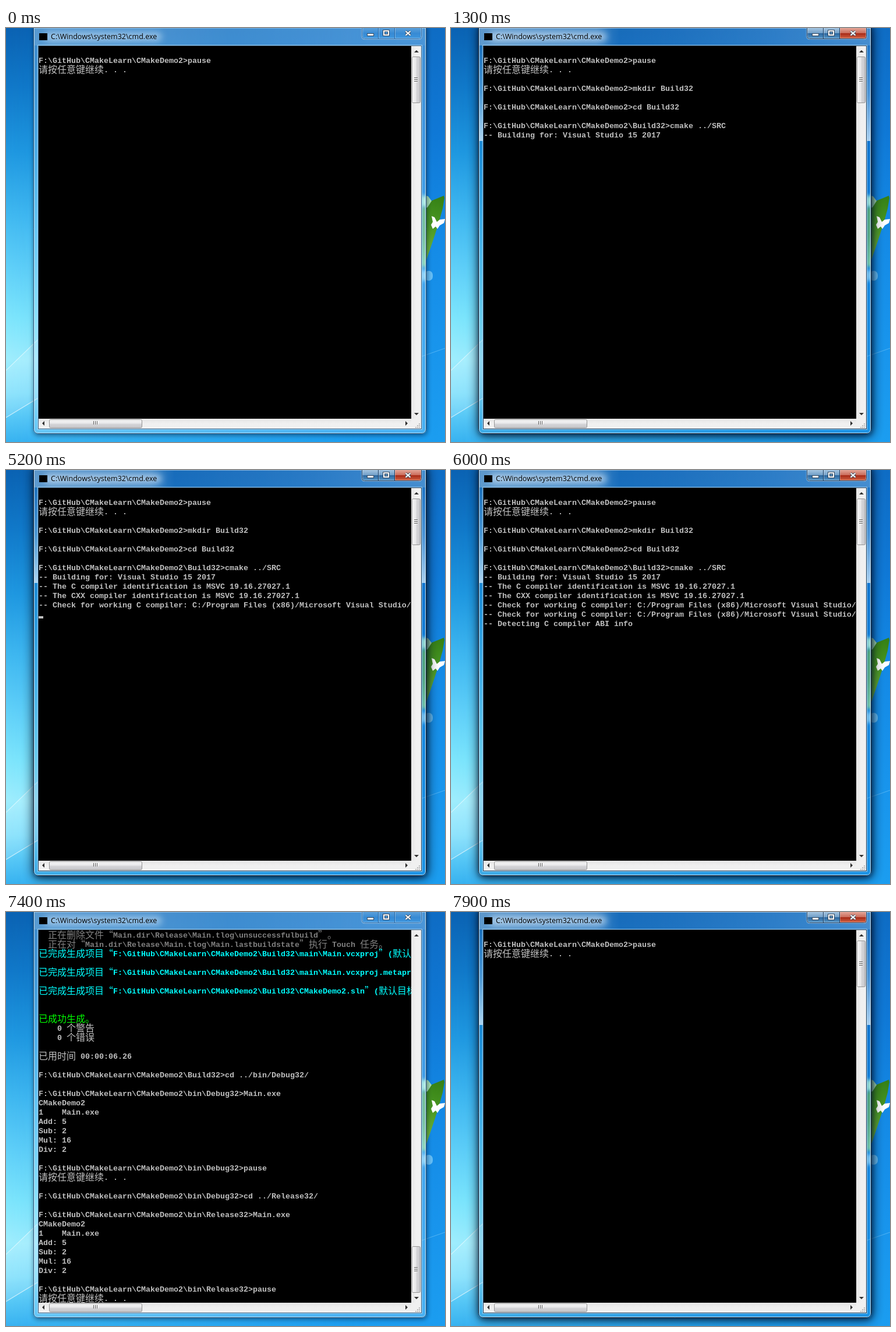
These frames come from a looping animation (754x711 px, 8000 ms). An HTML page with a canvas:

```html
<!DOCTYPE html>
<html lang="zh-CN">
<head>
<meta charset="utf-8">
<title>Console build</title>
<style>
  html, body { margin: 0; width: 100%; height: 100%; overflow: hidden; }
  canvas { display: block; }
</style>
</head>
<body>
<canvas id="stage" width="754" height="711"></canvas>
<script>
const W = 754, H = 711, LOOP = 8000, CELL = 8, ROW = 16;
const ctx = document.getElementById('stage').getContext('2d');

const MONO = 'bold 13.333px "Liberation Mono", monospace';
const CJK = '16px "Noto Sans CJK SC", "Noto Sans CJK", sans-serif';
const SILVER = '#c0c0c0', GRAY = '#808080', CYAN = '#00ffff', GREEN = '#00ff00';

// ---- console contents: a row is a string or [string, colour]
const ROOT = 'F:\\GitHub\\CMakeLearn\\CMakeDemo2';
const PRESS = '请按任意键继续. . . ';
const CHECK = '-- Check for working C compiler: C:/Program Files (x86)/Microsoft Visual Studio/';
const RESULT = ['CMakeDemo2', '1    Main.exe', 'Add: 5', 'Sub: 2', 'Mul: 16', 'Div: 2', ''];
const done = path => [`已完成生成项目“${ROOT}\\Build32\\${path}”(默认目标)的操作。`, CYAN];

const configure = [
  '', ROOT + '>pause', PRESS, '',
  ROOT + '>mkdir Build32', '',
  ROOT + '>cd Build32', '',
  ROOT + '\\Build32>cmake ../SRC',
  '-- Building for: Visual Studio 15 2017',
  '-- The C compiler identification is MSVC 19.16.27027.1',
  '-- The CXX compiler identification is MSVC 19.16.27027.1',
  CHECK, CHECK,
  '-- Detecting C compiler ABI info',
  '-- Detecting C compiler ABI info - done',
  '-- Detecting C compile features'
];
const finished = [
  ['  正在删除文件“Main.dir\\Release\\Main.tlog\\unsuccessfulbuild”。', GRAY],
  ['  正在对“Main.dir\\Release\\Main.tlog\\Main.lastbuildstate”执行 Touch 任务。', GRAY],
  done('main\\Main.vcxproj'), '',
  done('main\\Main.vcxproj.metaproj'), '',
  done('CMakeDemo2.sln'), '', '',
  ['已成功生成。', GREEN],
  '    0 个警告', '    0 个错误', '',
  '已用时间 00:00:06.26', '',
  ROOT + '\\Build32>cd ../bin/Debug32/', '',
  ROOT + '\\bin\\Debug32>Main.exe', ...RESULT,
  ROOT + '\\bin\\Debug32>pause', PRESS, '',
  ROOT + '\\bin\\Debug32>cd ../Release32/', '',
  ROOT + '\\bin\\Release32>Main.exe', ...RESULT,
  ROOT + '\\bin\\Release32>pause', PRESS
];

// start time, rows shown, focused, cursor [column, row]
const steps = [
  [0, 3, false], [300, 3, true], [800, 3, true, [20, 2]],
  [1300, 10, true], [2300, 10, true, [0, 10]], [2700, 10, true], [3200, 10, true, [0, 10]],
  [3400, 11, true], [4200, 11, true, [0, 11]],
  [4500, 13, true], [5200, 13, true, [0, 13]], [5700, 13, true],
  [6000, 15, true], [6300, 15, false], [7100, 17, false],
  [7400, 'end', false], [7600, 0, false], [7700, 3, false], [7900, 3, true]
];

// ---- helpers
function gradient(x0, y0, x1, y1, ...stops) {
  const g = ctx.createLinearGradient(x0, y0, x1, y1);
  stops.forEach((s, i) => Array.isArray(s)
    ? g.addColorStop(s[0], s[1])
    : g.addColorStop(i / (stops.length - 1), s));
  return g;
}
function rect(x, y, w, h, fill) {
  ctx.fillStyle = fill;
  ctx.fillRect(x, y, w, h);
}
function round(x, y, w, h, r) {
  ctx.beginPath();
  ctx.roundRect(x, y, w, h, r);
}
function poly(fill, ...pts) {
  ctx.beginPath();
  for (let i = 0; i < pts.length; i += 2) ctx.lineTo(pts[i], pts[i + 1]);
  ctx.closePath();
  ctx.fillStyle = fill;
  ctx.fill();
}
function line(x0, y0, x1, y1, color, width = 1) {
  ctx.beginPath();
  ctx.moveTo(x0, y0);
  ctx.lineTo(x1, y1);
  ctx.strokeStyle = color;
  ctx.lineWidth = width;
  ctx.stroke();
}
function soft(blur, draw) {
  ctx.save();
  ctx.filter = `blur(${blur}px)`;
  draw();
  ctx.restore();
}

// ---- desktop
function sky() {
  rect(0, 0, W, H, gradient(0, 0, 0, H, '#0e6cc4', '#0f78d6', '#148ae6', '#1894ec', '#1b9df0'));
  const layer = document.createElement('canvas');
  layer.width = W;
  layer.height = H;
  const c = layer.getContext('2d');
  let g = c.createLinearGradient(0, 0, 0, H);
  [[0, '#0a62b2'], [.14, '#1078c8'], [.3, '#1f98e0'], [.45, '#40b8f0'], [.58, '#60d0f8'],
   [.7, '#7ee6fc'], [.8, '#a0eefd'], [.88, '#80e0fb'], [.94, '#58c8f6'], [1, '#38b2f0']]
    .forEach(s => g.addColorStop(...s));
  c.fillStyle = g;
  c.fillRect(0, 0, W, H);
  c.globalCompositeOperation = 'destination-in';
  g = c.createLinearGradient(0, 0, 620, 0);
  g.addColorStop(0, '#000');
  g.addColorStop(.12, 'rgba(0,0,0,.9)');
  g.addColorStop(1, 'rgba(0,0,0,0)');
  c.fillStyle = g;
  c.fillRect(0, 0, W, H);
  ctx.drawImage(layer, 0, 0);

  poly('rgba(255,255,255,.13)', 0, 588, 56, 534, 56, 636, 0, 668);
  line(0, 588, 56, 534, 'rgba(255,255,255,.5)', 1.2);
  line(0, 669, 56, 635, 'rgba(255,255,255,.65)', 1.2);
  line(714, 564, 754, 550, 'rgba(150,215,255,.45)');
}

function plant() {
  poly(gradient(722, 400, 754, 290, '#7cbc40', '#4c9a24', '#347f14'),
    722, 303, 730, 297, 752, 288, 753, 292, 750, 310, 744, 332, 737, 354, 729, 378, 722, 398);
  poly('#a8e0b4', 721, 288, 725, 289, 731, 297, 724, 308, 721, 309);
  round(719, 417, 14, 17, 7);
  ctx.fillStyle = 'rgba(130,205,250,.75)';
  ctx.fill();
  poly('#fff', 731, 323, 736, 325, 740, 333, 745, 329, 754, 328, 752, 335, 745, 339,
    741, 345, 738, 341, 733, 345, 730, 338, 733, 333);
}

// ---- window
function caption(active) {
  const left = 611, right = 714, base = 19;
  ctx.save();
  round(left, -5, right - left, base + 5, 4);
  ctx.clip();
  rect(left, 0, 56, base, active
    ? gradient(0, 0, 0, base, [0, '#a4c4e0'], [.47, '#719fc8'], [.5, '#2c679f'], [1, '#5b9ccc'])
    : gradient(0, 0, 0, base, '#5a9fda', '#378ad4', '#3f98e0'));
  rect(667, 0, 47, base, active
    ? gradient(0, 0, 0, base, [0, '#e4a698'], [.45, '#cb6d5c'], [.5, '#a92b17'], [1, '#d4694a'])
    : gradient(0, 0, 0, base, '#5a9fda', '#378ad4', '#3f98e0'));
  ctx.restore();
  const edge = active ? '#173a60' : '#2465a4';
  round(left + .5, -5.5, right - left - 1, base + 5, 4);
  ctx.strokeStyle = 'rgba(255,255,255,.5)';
  ctx.lineWidth = 2.4;
  ctx.stroke();
  ctx.strokeStyle = edge;
  ctx.lineWidth = 1;
  ctx.stroke();
  for (const x of [639.5, 667.5]) {
    line(x, 0, x, base - 1, edge);
    line(x + 1, 0, x + 1, base - 2, 'rgba(255,255,255,.35)');
  }

  const ink = '#34485e';
  rect(620, 9, 12, 5, ink);
  rect(621, 10, 10, 3, '#fff');
  rect(647, 3, 12, 11, ink);
  rect(648, 4, 10, 9, '#fff');
  rect(650, 6, 6, 5, ink);
  rect(651, 7, 4, 3, active ? '#5d91bd' : '#4d9ade');
  for (const [color, width] of [[ink, 4.2], ['#fff', 2.3]]) {
    line(686.5, 5.5, 694.5, 12.5, color, width);
    line(694.5, 5.5, 686.5, 12.5, color, width);
  }
}

function frame(active) {
  const shape = () => round(47, -8, 675, 705, 7);
  const shadow = (blur, color) => {
    ctx.save();
    ctx.shadowColor = color;
    ctx.shadowBlur = blur;
    ctx.shadowOffsetX = 1;
    ctx.shadowOffsetY = 2;
    shape();
    ctx.fillStyle = '#2f86cc';
    ctx.fill();
    ctx.restore();
  };
  if (active) shadow(20, 'rgba(0,10,30,.9)');
  shadow(9, 'rgba(0,20,50,.6)');

  ctx.save();
  shape();
  ctx.clip();
  sky();
  soft(3, () => {
    rect(713, 288, 12, 20, '#b4f4d8');
    rect(713, 308, 12, 102, gradient(0, 308, 0, 410, '#5fb46c', '#69b878', '#8cdca4'));
    rect(713, 416, 12, 18, '#8cd4fa');
  });
  if (active) {
    rect(47, 0, 675, H, 'rgba(40,100,165,.16)');
    rect(47, 0, 675, 30, gradient(47, 0, 722, 0,
      [0, 'rgba(190,215,235,.45)'], [.3, 'rgba(190,215,235,.3)'], [.36, 'rgba(120,170,215,.08)'],
      [.7, 'rgba(150,195,230,.18)'], [1, 'rgba(190,220,240,.3)']));
    rect(47, 30, 675, 164, gradient(0, 30, 0, 194,
      'rgba(200,225,245,.08)', 'rgba(205,228,246,.3)', 'rgba(222,238,250,.75)'));
  } else {
    rect(47, 0, 675, H, 'rgba(190,230,252,.28)');
    rect(47, 0, 675, 30, gradient(47, 0, 722, 0,
      'rgba(255,255,255,.14)', 'rgba(255,255,255,0)', 'rgba(255,255,255,.06)'));
  }
  soft(6, () => {
    round(66, 7, 202, 16, 8);
    ctx.fillStyle = active ? 'rgba(225,238,248,.62)' : 'rgba(225,240,252,.5)';
    ctx.fill();
  });
  ctx.restore();

  ctx.lineWidth = 1;
  round(48.5, -8.5, 672, 704, 6);
  ctx.strokeStyle = active ? 'rgba(215,240,255,.85)' : 'rgba(215,242,255,.75)';
  ctx.stroke();
  round(47.5, -8.5, 674, 705, 7);
  ctx.strokeStyle = active ? '#0c1e34' : '#2b5378';
  ctx.stroke();
  line(49, .5, 721, .5, active ? 'rgba(200,225,245,.6)' : 'rgba(180,220,250,.5)');

  ctx.strokeStyle = 'rgba(190,228,250,.75)';
  ctx.strokeRect(54.5, 29.5, 660, 660);
  ctx.strokeStyle = active ? '#1d3c5c' : '#345d82';
  ctx.strokeRect(55.5, 30.5, 658, 658);

  rect(57, 9, 14, 12, '#000');
  ctx.fillStyle = '#000';
  ctx.font = '12.5px "Open Sans", sans-serif';
  ctx.fillText('C:\\Windows\\system32\\cmd.exe', 77, 19);
  caption(active);
}

function thumb(x, y, w, h, vertical) {
  const shade = [[0, '#f6f6f6'], [.48, '#e8e8ea'], [.52, '#d6d6d9'], [1, '#c6c6ca']];
  round(x + .5, y + .5, w - 1, h - 1, 2);
  ctx.fillStyle = vertical
    ? gradient(x, 0, x + w, 0, ...shade)
    : gradient(0, y, 0, y + h, ...shade);
  ctx.fill();
  ctx.strokeStyle = '#949494';
  ctx.lineWidth = 1;
  ctx.stroke();
  const cx = Math.floor(x + w / 2), cy = Math.floor(y + h / 2);
  for (const d of [-4, -1, 2]) {
    if (vertical) {
      rect(cx - 3, cy + d, 6, 1, '#555');
      rect(cx - 3, cy + d + 1, 6, 1, '#fff');
    } else {
      rect(cx + d, cy - 4, 1, 6, '#555');
      rect(cx + d + 1, cy - 4, 1, 6, '#fff');
    }
  }
}

function scrollbars(top) {
  rect(696, 31, 17, 640, gradient(696, 0, 713, 0, '#e6e6e6', '#f0f0f0', '#f1f1f1'));
  rect(56, 671, 640, 17, gradient(0, 671, 0, 688, '#e6e6e6', '#f0f0f0', '#f1f1f1'));
  rect(696, 671, 17, 17, '#f0f0f0');
  const ink = '#303030';
  poly(ink, 701, 42, 705, 38, 709, 42);
  poly(ink, 701, 661, 709, 661, 705, 665);
  poly(ink, 66, 675, 62, 679, 66, 683);
  poly(ink, 686, 675, 690, 679, 686, 683);
  thumb(697, top, 15, 80, true);
  thumb(74, 672, 160, 15, false);
  for (let i = 0; i < 3; i++)
    for (let j = 2 - i; j < 3; j++) rect(703 + j * 3, 679 + i * 3, 2, 2, '#b8b8b8');
}

// ---- console text
function writeRow(row, index) {
  const [text, color] = Array.isArray(row) ? row : [row, SILVER];
  const y = 31 + index * ROW;
  let x = 56;
  ctx.fillStyle = color;
  for (const run of text.match(/[\x20-\x7e]+|[^\x20-\x7e]+/g) || []) {
    const narrow = run.charCodeAt(0) < 127;
    ctx.font = narrow ? MONO : CJK;
    ctx.fillText(run, x, y + (narrow ? 13 : 14));
    x += run.length * (narrow ? CELL : CELL * 2);
  }
}

function paint([, shown, active, cursor]) {
  const atEnd = shown === 'end';
  sky();
  plant();
  frame(active);
  scrollbars(atEnd ? 574 : 49);
  ctx.save();
  ctx.beginPath();
  ctx.rect(56, 31, 640, 640);
  ctx.clip();
  rect(56, 31, 640, 640, '#000');
  (atEnd ? finished : configure.slice(0, shown)).forEach(writeRow);
  if (cursor) rect(56 + cursor[0] * CELL, 43 + cursor[1] * ROW, CELL, 4, SILVER);
  ctx.restore();
}

const start = performance.now();
let current;
function tick() {
  const t = (performance.now() - start) % LOOP;
  const step = steps.findLast(s => s[0] <= t);
  if (step !== current) paint(current = step);
  requestAnimationFrame(tick);
}
tick();
</script>
</body>
</html>
```
